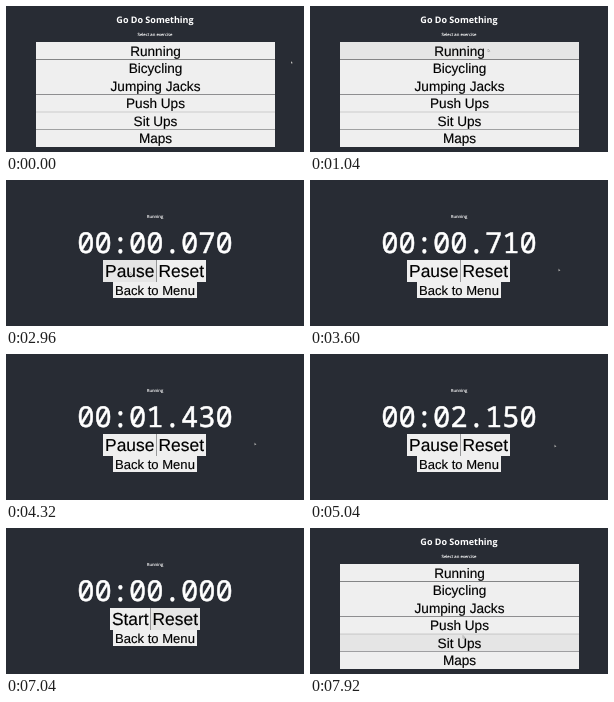
Animation, 298 px wide and 146 px high, one loop 8000 ms. Source, as an HTML page:

```html
<!DOCTYPE html>
<html lang="en">
<head>
<meta charset="utf-8">
<title>Exercise timer</title>
<style>
  html, body { margin: 0; width: 100%; height: 100%; overflow: hidden; background: #282c34; }
  svg { display: block; width: 298px; height: 146px; }
  text { text-anchor: middle; fill: #fff; text-rendering: geometricPrecision; }
  .title { font: bold 9px "Open Sans", sans-serif; }
  .note { font: 4.25px "Open Sans", sans-serif; stroke: #fff; stroke-width: .12; }
  .clock { font: 28.8px "Noto Sans Mono", monospace; white-space: pre; stroke: #fff; stroke-width: .55; }
  .btn rect { fill: #efefef; }
  .btn.hover rect { fill: #e5e5e5; }
  .btn text { font-family: "Liberation Sans", Arial, sans-serif; fill: #000; stroke: #000; stroke-width: .15; }
  .rule { stroke: #555; stroke-width: .6; }
  #cursor { fill: #fff; fill-opacity: .85; stroke: #222; stroke-width: .25; }
</style>
</head>
<body>
<svg viewBox="0 0 298 146">
  <g id="menu">
    <text class="title" x="149" y="17">Go Do Something</text>
    <text class="note" x="149" y="30">Select an exercise</text>
  </g>
  <g id="timer">
    <text class="note" x="149" y="38">Running</text>
    <text class="clock" id="clock" x="149" y="72.8">00:00.000</text>
  </g>
  <path id="cursor" d="M0 0V3L.8 2.3L2 2.2Z"/>
</svg>
<script>
const LOOP = 8000, STEP = 80;
const START = 2890, PAUSE = 5790, RESET = 7040, OPEN = 1600, BACK = 7920;
const $ = id => document.getElementById(id);
const menu = $('menu'), timer = $('timer'), clock = $('clock'), cursor = $('cursor');

function add(parent, tag, attrs) {
  const el = document.createElementNS('http://www.w3.org/2000/svg', tag);
  for (const k in attrs) el.setAttribute(k, attrs[k]);
  return parent.appendChild(el);
}

function button(parent, label, x, y, w, h, size) {
  const el = add(parent, 'g', { class: 'btn' });
  add(el, 'rect', { x, y, width: w, height: h });
  add(el, 'text', { x: x + w / 2, y: y + h / 2 + size * .35, 'font-size': size }).textContent = label;
  return { el, x, y, w, h };
}

function rule(parent, x1, y1, x2, y2, opacity) {
  add(parent, 'line', { class: 'rule', x1, y1, x2, y2, opacity });
}

const rowH = 17.5, top0 = 36;
const rows = ['Running', 'Bicycling', 'Jumping Jacks', 'Push Ups', 'Sit Ups', 'Maps']
  .map((name, i) => button(menu, name, 30, top0 + i * rowH, 239, rowH, 13.6));
[.9, 0, .75, .4, .45].forEach((opacity, i) => {
  const y = top0 + (i + 1) * rowH;
  rule(menu, 30, y, 269, y, opacity);
});

// A button pair that meets at x = split, with a thin seam between.
function pair(label, left, split) {
  const el = add(timer, 'g', {});
  const list = [
    button(el, label, left, 80, split - left, 22, 17.4),
    button(el, 'Reset', split, 80, 49.5, 22, 17.4)
  ];
  rule(el, split, 80, split, 102, .6);
  return { el, list };
}

const idle = pair('Start', 104, 144.5);
const active = pair('Pause', 97, 150.5);
const back = button(timer, 'Back to Menu', 107, 102, 84, 16, 13.06);
const buttons = [...rows, ...idle.list, ...active.list, back];

// time, x, y
const path = [
  [0, 285, 55], [640, 285, 55], [1040, 178, 43], [2080, 178, 43], [2640, 124, 92],
  [2960, 124, 92], [3520, 248.5, 88.5], [4640, 248.5, 88.5], [5040, 244.5, 90.5],
  [5520, 115, 92], [6000, 115, 92], [6400, 213, 95], [6560, 183, 93],
  [7120, 183, 93], [7760, 153, 107.5], [LOOP, 153, 107.5]
];

function pointer(t) {
  const i = path.findIndex(p => p[0] > t);
  const [t0, x0, y0] = path[i - 1], [t1, x1, y1] = path[i];
  const u = (t - t0) / (t1 - t0), e = u * u * (3 - 2 * u);
  return [x0 + (x1 - x0) * e, y0 + (y1 - y0) * e];
}

function format(ms) {
  const pad = (n, len) => String(n).padStart(len, '0');
  const s = Math.floor(ms / 1000);
  return `${pad(Math.floor(s / 60), 2)}:${pad(s % 60, 2)}.${pad(ms % 1000, 3)}`;
}

const show = (el, on) => { el.style.display = on ? '' : 'none'; };

function draw(t) {
  const timing = t >= OPEN && t < BACK;
  const running = t >= START && t < PAUSE;
  show(menu, !timing);
  show(timer, timing);
  show(idle.el, !running);
  show(active.el, running);
  clock.textContent = format(t < RESET ? Math.max(0, Math.min(t, PAUSE) - START) : 0);

  const [x, y] = pointer(t);
  cursor.setAttribute('transform', `translate(${x} ${y})`);
  for (const b of buttons) {
    const over = x >= b.x && x < b.x + b.w && y >= b.y && y < b.y + b.h;
    b.el.classList.toggle('hover', over);
  }
}

function tick() {
  const t = performance.now() % LOOP;
  draw(Math.floor(t / STEP) * STEP);
  requestAnimationFrame(tick);
}
tick();
</script>
</body>
</html>
```
